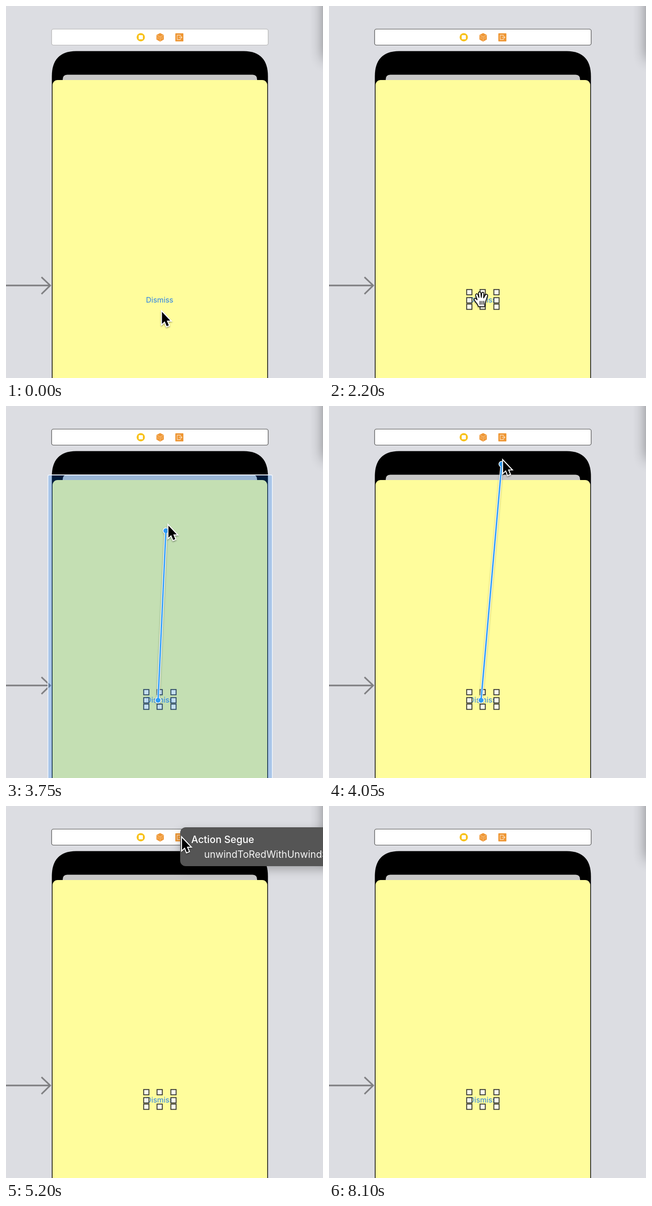
Write an HTML page that moves like this. It is 688 by 804 pixels and loops after 8.15 s.

```html
<!DOCTYPE html>
<html lang="en">
<head>
<meta charset="utf-8">
<title>Connecting a button to an exit</title>
<style>
  html, body { margin: 0; width: 100%; height: 100%; overflow: hidden; background: #dcdde2; }
  svg { display: block; }
  text { font-family: Inter, Roboto, sans-serif; }
  #popup { filter: drop-shadow(0 8px 10px rgba(0, 0, 0, .25)); }
  #arrow, #hand { filter: drop-shadow(0 2px 1.5px rgba(0, 0, 0, .35)); }
  #link { filter: drop-shadow(0 2px 2px rgba(0, 0, 0, .25)); }
</style>
</head>
<body>
<svg width="688" height="804" viewBox="0 0 688 804">
  <defs>
    <filter id="blur" x="-50%" y="-50%" width="200%" height="200%">
      <feGaussianBlur stdDeviation="15"/>
    </filter>
  </defs>
  <rect width="688" height="804" fill="#dcdde2"/>
  <rect x="690" y="-150" width="200" height="265" opacity=".45" filter="url(#blur)"/>

  <!-- scene bar and its icons -->
  <rect id="bar" x="99" y="50" width="470" height="34.5" rx="4" fill="#fff" stroke-width="1.2"/>
  <circle cx="292.5" cy="67.5" r="9" fill="#f8c21c"/>
  <rect x="288" y="63" width="9" height="9" rx="1.5" fill="#fff"/>
  <path d="M334.500 58.500L342.500 62.500V72.500L334.500 77L326.500 72.500V62.500Z" fill="#ef9735"/>
  <path d="M327 63L334.500 66.500L342 63M334.500 66.500V76M330 67V71.500M338.500 67V71.500" fill="none" stroke="#f9cf9c" stroke-width="1"/>
  <rect x="367.500" y="59" width="17.500" height="17.500" rx="1" fill="#ee9633"/>
  <path d="M378.500 65.500V63H371.500V72.500H378.500V70M375 67.700H382M379.500 65.500L382 67.700L379.500 70" fill="none" stroke="#fbdcb8" stroke-width="1.300"/>

  <!-- phone -->
  <path d="M99.500 810V152Q99.500 98 152 97.500H516Q568.500 98 568.500 152V810Z"/>
  <path d="M123 165V159Q123 148.500 133 148.500H535Q545 148.500 545 159V165Z" fill="#c8c8c8"/>
  <rect x="101" y="160" width="466" height="700" rx="11" fill="#fffd9c"/>
  <path d="M0 604H95M77 586L96 604L77 622.500" fill="none" stroke="#808083" stroke-width="3.300"/>
  <text x="333.500" y="640.500" font-size="16.200" text-anchor="middle" fill="#2a83e6">Dismiss</text>
  <g id="handles" fill="#fff" fill-opacity=".8" stroke="#3a3a36" stroke-width="2"></g>
  <rect id="tint" x="91" y="149" width="487" height="700" rx="3" fill="#007aff" fill-opacity=".23" stroke="#edf2fa" stroke-width="1.800"/>

  <!-- drag connection -->
  <g id="link">
    <path class="wire" stroke="#fff" stroke-width="5.500"/>
    <circle class="end" r="6.800" fill="#fff"/>
    <circle cx="330" cy="636" r="6.800" fill="#fff"/>
    <path class="wire" stroke="#2f9cf6" stroke-width="3"/>
    <circle class="end" r="5.300" fill="#2f9cf6"/>
    <circle cx="330" cy="636" r="5.300" fill="#2f9cf6"/>
  </g>

  <g id="popup">
    <rect x="378" y="46" width="420" height="84" rx="12" fill="#555"/>
    <rect id="row" x="378" y="88" width="420" height="32" fill="#404040"/>
    <text x="402" y="80" font-size="21.400" font-weight="500" fill="#fff">Action Segue</text>
    <text x="430" y="112" font-size="21" fill="#f4f4f4">unwindToRedWithUnwindSegue:</text>
  </g>

  <path id="hand" fill="#fff" stroke="#000" stroke-width="1.700" stroke-linejoin="round" stroke-linecap="round"
    d="M-6 15.500C-7 9-15 4-15 0C-15-3-11-3-8.500 1L-11.500-8C-12.500-12-8.500-13.500-7-10L-4.500-4L-5.500-13C-5.500-17-1-17-.500-13.500L.500-4L1.500-13C2-16.500 6.500-16 6-12.500L5.500-3L9-9C11-12.500 15.500-11 14-7L10.500 3C9.500 8 8 10 8 15.500ZM-2 4V11M2 4V11M6 4V11"/>
  <path id="arrow" stroke="#fff" stroke-width="4.200" paint-order="stroke" stroke-linejoin="miter"
    d="M0 0V26L6 20.500L10.300 31L14.800 29.200L10.500 19H18Z"/>
</svg>
<script>
const $ = id => document.getElementById(id);
const LOOP = 8150;
const SELECT = 1200, DRAG = 2800, LEAVE = 4030, DROP = 4500, CHOOSE = 6000;

// Rows are time, x, y
const pointer = [
  [0, 338.5, 661], [50, 338.5, 661], [800, 329, 626], [DRAG, 331, 622],
  [3150, 335.5, 579], [3750, 352.5, 259], [4150, 381.5, 89], [4350, 380, 61],
  [5200, 382, 69], [5650, 459.5, 108], [7750, 459.5, 108], [8050, 586, -42], [LOOP, 586, -42]
];
const wireEnd = [
  [DRAG, 330, 636], [3150, 330, 594], [3750, 347, 270], [4150, 379, 98], [4400, 377, 70], [LOOP, 377, 70]
];

for (const y of [618.5, 636, 650])
  for (const x of [304.5, 333.5, 363.5])
    if (x !== 333.5 || y !== 636)
      $('handles').innerHTML += `<rect x="${x - 5.7}" y="${y - 5.7}" width="11.4" height="11.4"/>`;

const clamp = v => Math.max(0, Math.min(1, v));

// Monotone cubic through the keys: smooth, and still where a key repeats
function track(keys, t, axis) {
  const last = keys.length - 2;
  let i = 0;
  while (i < last && t >= keys[i + 1][0]) i++;
  const slope = n => n < 0 || n > last ? 0 :
    (keys[n + 1][axis] - keys[n][axis]) / (keys[n + 1][0] - keys[n][0]);
  const tangent = n => {
    const a = slope(n - 1), b = slope(n);
    return a * b > 0 ? 2 * a * b / (a + b) : 0;
  };
  const d = keys[i + 1][0] - keys[i][0], u = clamp((t - keys[i][0]) / d), v = 1 - u;
  return v * v * (1 + 2 * u) * keys[i][axis] + u * u * (3 - 2 * u) * keys[i + 1][axis]
    + d * u * v * (v * tangent(i) - u * tangent(i + 1));
}

const show = (id, on) => $(id).style.display = on ? '' : 'none';

function draw(t) {
  const x = track(pointer, t, 1), y = track(pointer, t, 2);
  const ex = track(wireEnd, t, 1), ey = track(wireEnd, t, 2);
  const holding = t >= SELECT && t < DRAG;

  $('bar').setAttribute('stroke', t < SELECT ? '#b0b0b0' : '#444');
  show('handles', t >= SELECT);
  show('tint', t >= DRAG && t < LEAVE);
  show('link', t >= DRAG && t < DROP);
  document.querySelectorAll('.wire').forEach(w => w.setAttribute('d', `M330 636L${ex} ${ey}`));
  document.querySelectorAll('.end').forEach(c => c.setAttribute('transform', `translate(${ex} ${ey})`));

  const alpha = Math.min(clamp((t - DROP) / 150), clamp(1 - (t - CHOOSE) / 185));
  show('popup', alpha > 0);
  $('popup').style.opacity = alpha;
  show('row', y > 88);

  show('hand', holding);
  show('arrow', !holding);
  $('hand').setAttribute('transform', 'translate(330 634)');
  $('arrow').setAttribute('transform', `translate(${x} ${y})`);
}

const start = performance.now();
function tick() {
  draw((performance.now() - start) % LOOP);
  requestAnimationFrame(tick);
}
tick();
</script>
</body>
</html>
```
